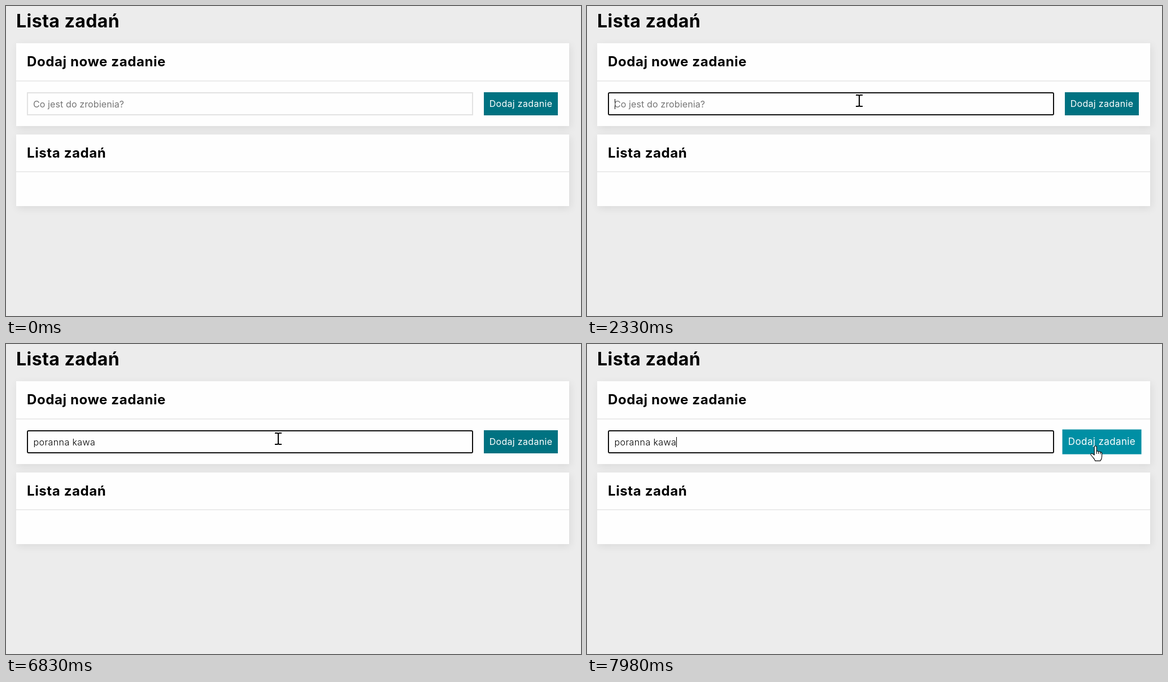
These frames come from a looping animation (1018x550 px, 8000 ms). An HTML page:

```html
<!DOCTYPE html>
<html lang="pl">
<head>
<meta charset="utf-8">
<title>Lista zadań</title>
<style>
  * { box-sizing: border-box; margin: 0; }
  html, body { width: 100%; height: 100%; overflow: hidden; background: #ececec; }
  body { position: relative; font: 16px Montserrat, Inter, sans-serif; color: #000; }
  h1, h2, .panel, .field, .button, .cursor { position: absolute; }
  h1, h2 { font-weight: 700; white-space: nowrap; }
  h1 { left: 18px; top: 7px; font-size: 32px; line-height: 40px; letter-spacing: .014em; }
  h2 { left: 19.5px; top: 17px; font-size: 24px; line-height: 31px; letter-spacing: .025em; }

  .panel { left: 17.5px; width: 979.5px; background: #fefefe; box-shadow: 2px 4px 14px rgba(0, 0, 0, .08); }
  .panel::after { content: ""; position: absolute; top: 66px; width: 100%; height: 2px; background: #ebebeb; }
  .form { top: 66px; height: 147px; }
  .list { top: 228px; height: 127px; }
  .list::after { top: 65px; }

  .field {
    left: 37px; top: 153px; width: 790px; height: 41px; padding-left: 9.5px;
    display: flex; align-items: center; white-space: pre;
    border: 2px solid #e2e2e2;
    animation: focus 8s step-end infinite;
  }
  .hint { position: absolute; left: 9px; letter-spacing: .007em; color: #757575; }
  .typed { font-weight: 350; letter-spacing: .025em; }
  .caret { width: 1px; height: 18px; background: #000; }

  .button {
    left: 846px; top: 153px; width: 131px; height: 41px;
    line-height: 41px; text-align: center; white-space: nowrap;
    letter-spacing: .02em; color: #fff; background: #007281;
    animation: hover 8s infinite;
  }

  .cursor { left: 0; top: 0; width: 1px; height: 1px; overflow: visible; animation: glide 8s linear infinite; }
  .cursor path { fill: #fff; stroke: #000; stroke-linejoin: round; visibility: hidden; }
  .cursor .arrow { stroke-width: .9; animation: arrow 8s step-end infinite; }
  .cursor .beam { fill: none; stroke-width: 2; animation: beam 8s step-end infinite; }
  .cursor .hand { stroke-width: 1.1; animation: hand 8s step-end infinite; }

  @keyframes focus {
    0% { border-color: #e2e2e2; border-radius: 0; }
    22.5%, 100% { border-color: #101010; border-radius: 3px; }
  }
  @keyframes hover {
    0%, 94.5% { background: #007281; transform: none; }
    98.25%, 100% { background: #008fa4; transform: scale(1.068); }
  }
  @keyframes glide {
    0%, 6.125% { transform: translate(848px, 545px); }
    9.375% { transform: translate(600px, 410px); }
    11.25% { transform: translate(530px, 340px); }
    12.625% { transform: translate(502px, 297px); }
    16% { transform: translate(485px, 206px); animation-timing-function: ease-out; }
    18.625% { transform: translate(482px, 168px); }
    86.625% { transform: translate(482px, 168px); animation-timing-function: cubic-bezier(.3, 0, .7, .7); }
    92.25% { transform: translate(747px, 195px); }
    93.4% { transform: translate(795px, 197px); }
    94.5% { transform: translate(848px, 193px); animation-timing-function: ease-out; }
    99.75%, 100% { transform: translate(901px, 181px); }
  }
  @keyframes arrow {
    0% { visibility: hidden; }
    6.125% { visibility: visible; }
    16.75% { visibility: hidden; }
    92.65% { visibility: visible; }
    94.5%, 100% { visibility: hidden; }
  }
  @keyframes beam {
    0% { visibility: hidden; }
    16.75% { visibility: visible; }
    92.65%, 100% { visibility: hidden; }
  }
  @keyframes hand {
    0% { visibility: hidden; }
    94.5%, 100% { visibility: visible; }
  }
</style>
</head>
<body>
  <h1>Lista zadań</h1>
  <section class="panel form"><h2>Dodaj nowe zadanie</h2></section>
  <section class="panel list"><h2>Lista zadań</h2></section>
  <div class="field"><span class="hint">Co jest do zrobienia?</span><span class="typed"></span><i class="caret"></i></div>
  <div class="button">Dodaj zadanie</div>
  <svg class="cursor">
    <path class="arrow" d="M.5 .5V20.5L5 16.3 8 23.4 10.8 22.2 7.8 15.2H14.6Z"/>
    <path class="beam" d="M-6-10h4q2 0 2 2V8q0 2-2 2h-4M6-10H2q-2 0-2 2M6 10H2q-2 0-2-2"/>
    <path class="hand" d="M-2.8 16V2a2 2 0 0 1 4 0V9.5Q3 8 4.6 10.2 6.6 9 8 11 10.6 10.4 10.6 13.5V18Q10.6 23 7.8 26.4H-1.4Q-2 23.5-5 20.5L-8.8 16Q-9.8 13.6-7.6 13.2-5.6 13-2.8 16ZM1.2 9.5V14M4.6 10.2V14M8 11V14.5"/>
  </svg>
<script>
  const LOOP = 8000, FOCUS = 1800, BLINK = 530;
  const LEAD = 12; // the next paint comes slightly after the clock is read
  const TEXT = "poranna kawa";
  const KEYS = [2760, 2990, 3250, 3610, 3900, 4100, 4230, 4530, 5160, 5520, 5640, 5770];

  const find = name => document.querySelector(name);
  const typed = find(".typed"), hint = find(".hint"), caret = find(".caret");

  // Typing shares the clock of the CSS animations.
  const clock = find(".field").getAnimations()[0];
  const show = (el, on) => { el.style.visibility = on ? "visible" : "hidden"; };

  function draw() {
    const t = ((clock.currentTime || 0) + LEAD) % LOOP;
    const count = KEYS.filter(k => k <= t).length;
    const since = t - (count ? KEYS[count - 1] : FOCUS);
    typed.textContent = TEXT.slice(0, count);
    show(hint, count === 0);
    show(caret, t >= FOCUS && Math.floor(since / BLINK) % 2 === 0);
    requestAnimationFrame(draw);
  }
  draw();
</script>
</body>
</html>
```
